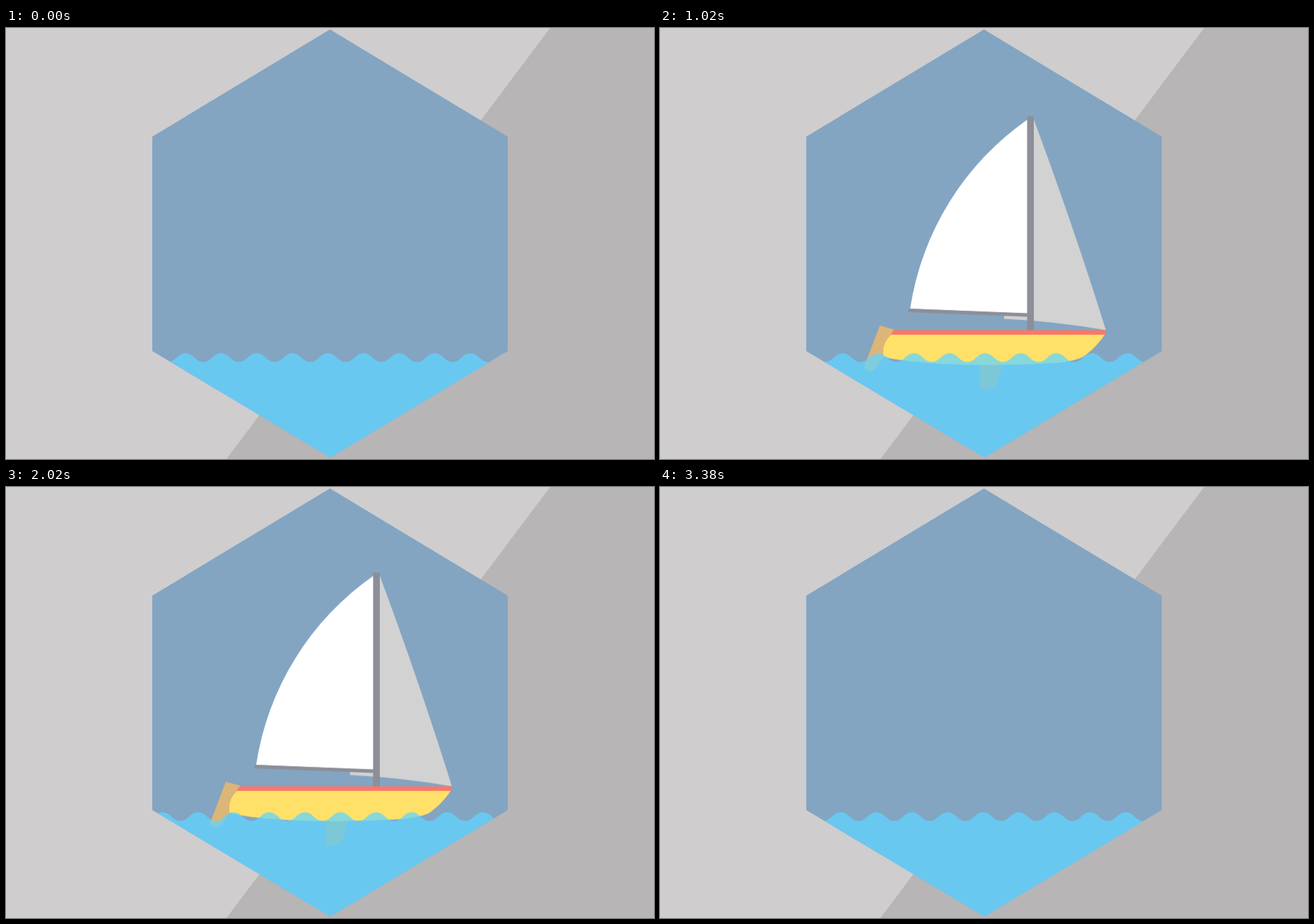
An HTML page without scripts that plays this animation: 917 px wide and 611 px high, repeating every 3.4 s.

```html
<!DOCTYPE html>
<html lang="en">
<head>
<meta charset="utf-8">
<title>Sailing boat</title>
<style>
  html, body { margin: 0; width: 100%; height: 100%; overflow: hidden; background: #cfcdce; }
  svg { display: block; width: 100vw; height: 100vh; }

  .waves { animation: flow 3400ms linear infinite; }
  .bob { animation: bob 850ms cubic-bezier(.37, 0, .63, 1) -1090ms infinite alternate; }
  .boat {
    transform-origin: 460px 468px;
    animation: pop 3400ms cubic-bezier(.33, 0, .67, 1) infinite;
  }

  /* six wave lengths of 50.4px per loop */
  @keyframes flow {
    0% { transform: translateX(0); }
    17.65% { transform: translateX(-59.5px); }
    69.4% { transform: translateX(-213.5px); }
    82.95% { transform: translateX(-248.9px); }
    100% { transform: translateX(-302.4px); }
  }
  @keyframes bob {
    from { transform: translateY(0); }
    to { transform: translateY(18.5px); }
  }
  @keyframes pop {
    0%, 17.65% { transform: scale(0); }
    29.4%, 70.6% { transform: scale(1); }
    82.35%, 100% { transform: scale(0); }
  }
</style>
</head>
<body>
<svg viewBox="0 0 917 611" preserveAspectRatio="none">
  <defs>
    <clipPath id="hexagon">
      <path d="M458.5 2 710 154V458L459 609 207 458V154Z"/>
    </clipPath>
  </defs>

  <path fill="#cfcdce" d="M0 0H917V611H0Z"/>
  <path fill="#b7b5b6" d="M770 0H917V611H312Z"/>

  <g clip-path="url(#hexagon)">
    <path fill="#83a5c2" d="M200 0H720V611H200Z"/>

    <g class="bob">
      <g class="boat">
        <path fill="#d2a45c" d="M453 466H485L476 495Q471 503.5 461 503.5 453 503.5 453 500Z"/>
        <path fill="#dcb578" d="M311 413 331 418.5 326 432 322 450 304 475Q299 481 288 473.5Z"/>
        <path fill="#d2d2d2" d="M520 121H529Q586 275 631 419.5 560 407 487 403.5V399H520Z"/>
        <path fill="#fff" d="M520 121A400 400 0 0 0 354 389L520 396Z"/>
        <path fill="#8c8e98" d="M352 389 520 395.5V400.5L351 394Z"/>
        <path fill="#8c8e98" d="M519.5 116.5H529V420H519.5Z"/>
        <path fill="#ffe169" d="M331 425H630Q618 443 602 455 592 463 560 466 480 471 400 467.5 335 463 316 457V450Q315 438 327 426Z"/>
        <path fill="#f97868" d="M331 419.5H631L630 426H326Z"/>
      </g>
    </g>

    <path class="waves" fill="#60d4ff" fill-opacity=".75" d="M191 467.3q12.6-12.6 25.2 0
      t25.2 0t25.2 0t25.2 0t25.2 0t25.2 0t25.2 0t25.2 0t25.2 0t25.2 0t25.2 0t25.2 0
      t25.2 0t25.2 0t25.2 0t25.2 0t25.2 0t25.2 0t25.2 0t25.2 0t25.2 0t25.2 0t25.2 0
      t25.2 0t25.2 0t25.2 0t25.2 0t25.2 0t25.2 0t25.2 0t25.2 0t25.2 0t25.2 0t25.2 0
      V611H191Z"/>
  </g>
</svg>
</body>
</html>
```
